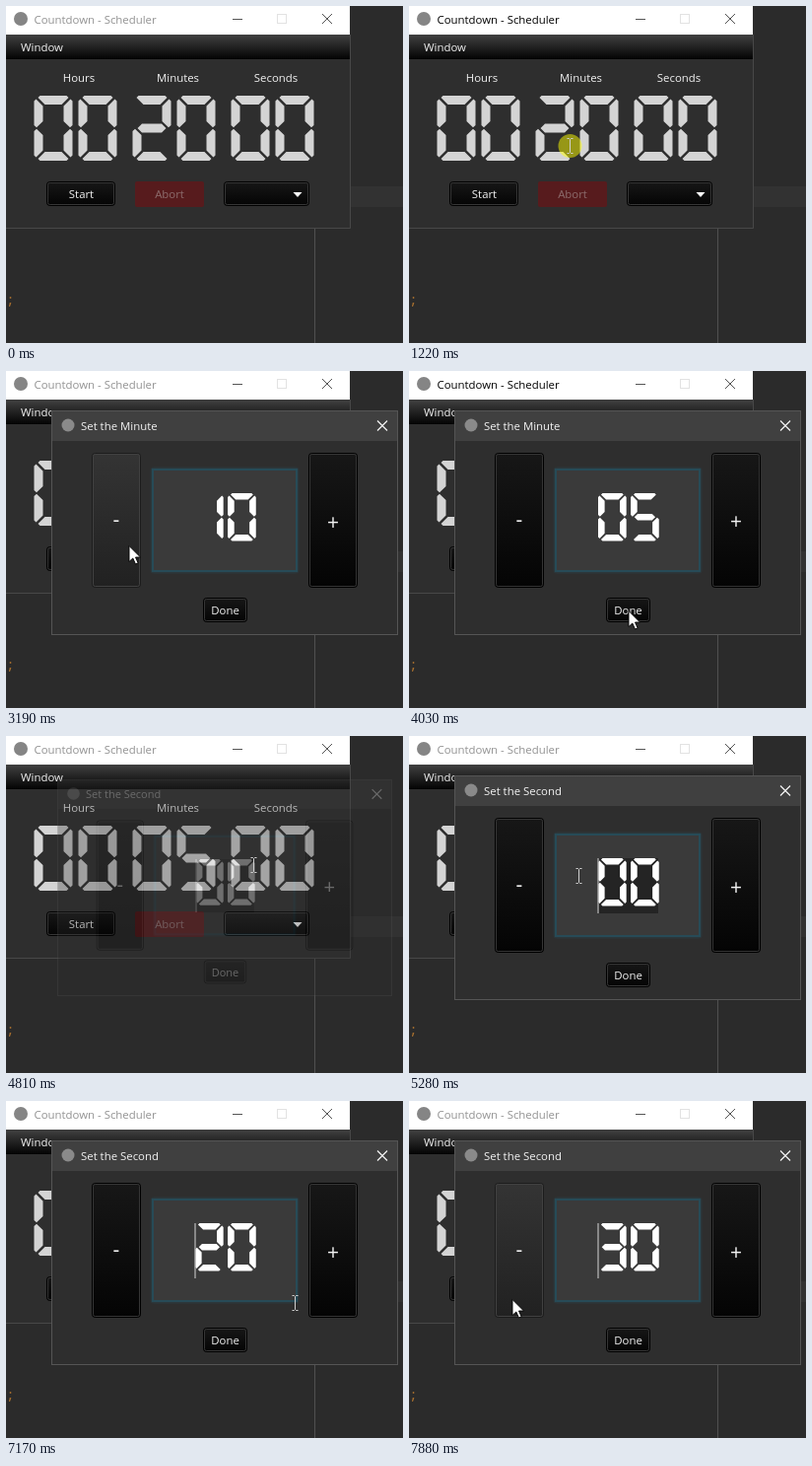
These frames come from a looping animation (403 by 342 pixels, 8 s). An HTML page:

```html
<!DOCTYPE html>
<html lang="en">
<head>
<meta charset="utf-8">
<title>Countdown</title>
<style>
html, body { margin: 0; width: 100%; height: 100%; overflow: hidden; background: #2b2b2b; }
svg { display: block; width: 403px; height: 342px; }
text { font: 11.4px "Open Sans", "Noto Sans", sans-serif; fill: #f2f2f2; }
.mid { text-anchor: middle; }
.sign { text-anchor: middle; font-size: 21px; }
.code { font: 14px "Noto Sans Mono", monospace; fill: #a8702f; }
.digits { fill: #d4d4d4; }
.button .face { fill: url(#dark); stroke: #000; }
.button .edge { fill: none; stroke: #353535; }
.button.hover .face { fill: url(#light); stroke: #1c1c1c; }
.button.hover .edge { stroke: #414141; }
</style>
</head>
<body>
<svg viewBox="0 0 403 342">
  <defs>
    <linearGradient id="dark" x2="0" y2="1"><stop stop-color="#171717"/><stop offset="1" stop-color="#040404"/></linearGradient>
    <linearGradient id="light" x2="0" y2="1"><stop stop-color="#343434"/><stop offset="1" stop-color="#212121"/></linearGradient>
    <linearGradient id="bar" x2="0" y2="1"><stop stop-color="#414141"/><stop offset="1" stop-color="#030303"/></linearGradient>
  </defs>

  <rect width="403" height="342" fill="#2b2b2b"/>
  <rect x="350" y="183" width="53" height="21" fill="#323232"/>
  <path d="M313.5 226V342" stroke="#505050"/>
  <text class="code" x="0" y="303">;</text>

  <g id="main">
    <rect width="350" height="226" fill="#2e2e2e"/>
    <path d="M349.5 29V225.5H0" fill="none" stroke="#484848"/>
    <rect width="349" height="29" fill="#fff"/>
    <circle cx="15" cy="13" r="7" fill="#858585"/>
    <text id="caption" x="28.5" y="18">Countdown - Scheduler</text>
    <path d="M230 13.5H240" stroke="#555"/>
    <rect x="275.5" y="8.5" width="9" height="9" fill="none" stroke="#e2e2e2"/>
    <path d="M321 8L331 18M331 8L321 18" stroke="#555"/>
    <rect y="29" width="349" height="25" fill="url(#bar)"/>
    <text x="15" y="46">Window</text>
    <text class="mid" x="74" y="77">Hours</text>
    <text class="mid" x="174.5" y="77">Minutes</text>
    <text class="mid" x="274" y="77">Seconds</text>
    <path class="digits" id="hours" transform="translate(28.5 91)"/>
    <path class="digits" id="minutes" transform="translate(128.5 91)"/>
    <path class="digits" id="seconds" transform="translate(228.5 91)"/>
    <g class="button" data-box="41 178 70 25"></g>
    <text class="mid" x="76.5" y="195">Start</text>
    <rect x="131" y="178" width="70" height="26" rx="2" fill="#571b1d"/>
    <text class="mid" x="166" y="195" style="fill:#8c6c6d">Abort</text>
    <g class="button" data-box="221 178 87 25"></g>
    <path d="M291.5 189H300.5L296 194Z" fill="#fff"/>
  </g>

  <g id="dialog">
    <rect x="46.5" y="40.5" width="351" height="227" fill="#2e2e2e" stroke="#555"/>
    <rect x="47" y="41" width="350" height="30" fill="#404040"/>
    <circle cx="63" cy="55" r="6.5" fill="#8a8a8a"/>
    <text id="heading" x="76" y="60"></text>
    <path d="M377 50.5L387 60.5M387 50.5L377 60.5" stroke="#f4f4f4" stroke-width="1.2"/>
    <g class="button" id="minus" data-box="87 83 50 137"></g>
    <text class="sign" x="112" y="158">-</text>
    <g class="button" id="plus" data-box="307 83 50 137"></g>
    <text class="sign" x="332" y="160.5" font-weight="600">+</text>
    <rect x="148" y="99" width="148" height="105" rx="2" fill="#3a3a3a" stroke="#2a4049" stroke-opacity=".5" stroke-width="3"/>
    <rect x="149" y="100" width="146" height="103" fill="none" stroke="#274b57" stroke-width="2"/>
    <rect id="mark" x="192" y="124" width="61" height="56" fill="#242424"/>
    <path id="value" fill="#fff" transform="translate(192 124) scale(.735)"/>
    <path id="caret" d="M192 124V180" stroke="#aaa" stroke-width="1.4"/>
    <g class="button" id="done" data-box="200 230 45 25"></g>
    <text class="mid" x="222.5" y="247">Done</text>
  </g>

  <g id="cursor">
    <circle id="press" r="12" fill="#ff0" opacity=".5"/>
    <path id="arrow" d="M.5 .5V16.5L4.3 13L7 19L9.6 17.8L7 12H12Z" fill="#fff" stroke="#000" stroke-width=".9"/>
    <path id="beam" d="M-3 -7.5H-1L0 -6.5L1 -7.5H3M0 -6.5V6.5M-3 7.5H-1L0 6.5L1 7.5H3" fill="none" stroke="#d0d0d0"/>
  </g>
</svg>

<script>
const LOOP = 8000, TICK = 78.37, FIRST = 200;
const $ = id => document.getElementById(id);
const show = (id, on) => { $(id).style.display = on ? "" : "none"; };
const clamp = v => Math.min(1, Math.max(0, v));

// Seven-segment glyphs on a 39 x 66 cell
const topBar = [[6, 0], [33, 0], [35, 2], [28, 9], [11, 9], [4, 2]];
const upLeft = [[2, 3.5], [0, 5.5], [0, 30], [2.5, 32.2], [9, 26], [9, 10.5]];
const middle = [[5, 33], [9.5, 28.5], [29.5, 28.5], [34, 33], [29.5, 37.5], [9.5, 37.5]];
const flipX = s => s.map(([x, y]) => [39 - x, y]);
const flipY = s => s.map(([x, y]) => [x, 66 - y]);
const segments = {
  a: topBar, b: flipX(upLeft), c: flipY(flipX(upLeft)), d: flipY(topBar),
  e: flipY(upLeft), f: upLeft, g: middle
};
const glyphs = { 0: "abcdef", 1: "bc", 2: "abged", 3: "abgcd", 5: "afgcd" };
const digits = text => [...text].map((ch, i) =>
  [...glyphs[ch]].map(s => "M" + segments[s].map(([x, y]) => [x + i * 45, y]).join("L") + "Z").join("")
).join("");

for (const b of document.querySelectorAll(".button")) {
  const [x, y, w, h] = b.dataset.box.split(" ").map(Number);
  b.innerHTML =
    `<rect class="face" x="${x + .5}" y="${y + .5}" width="${w - 1}" height="${h - 1}" rx="3"/>` +
    `<rect class="edge" x="${x + 1.5}" y="${y + 1.5}" width="${w - 3}" height="${h - 3}" rx="2"/>`;
}

// Pointer stops: time, x, y
const path = [
  [200, 262, 318], [750, 163, 142], [1770, 163, 142], [1840, 178, 147], [2230, 124, 177],
  [3400, 124, 177], [3880, 222, 243], [4250, 222, 243], [4650, 251, 131], [5130, 251, 131],
  [5430, 112, 150], [5600, 112, 150], [5990, 311, 152], [6060, 316, 156], [6840, 316, 156],
  [7000, 280, 236], [7090, 280, 236], [7165, 292, 206], [7240, 316, 180], [7490, 316, 180],
  [7870, 104, 201]
];
const presses = [[1140, 1290], [2540, 2615], [3180, 3325], [3950, 4030], [4650, 4735],
  [6070, 6150], [6230, 6310], [6700, 6770], [6780, 6850], [7325, 7395], [7405, 7480]];
const dialogs = [
  { name: "Minute", open: 1375, caret: 1330, close: 4040,
    values: [[0, "20"], [2390, "15"], [2615, "10"], [3325, "05"]] },
  { name: "Second", open: 4795, caret: 4795, close: Infinity,
    values: [[0, "00"], [6150, "05"], [6310, "10"], [6770, "15"], [6850, "20"], [7395, "25"], [7480, "30"]] }
];

function pointer(t) {
  const i = path.findIndex(p => p[0] > t);
  if (i < 0) return path[path.length - 1].slice(1);
  if (i === 0) return path[0].slice(1);
  const [t0, x0, y0] = path[i - 1], [t1, x1, y1] = path[i];
  const u = (t - t0) / (t1 - t0), k = u * u * (3 - 2 * u);
  return [x0 + (x1 - x0) * k, y0 + (y1 - y0) * k];
}

function drawDialog(d, t) {
  const p = t < d.close ? 1 - (1 - clamp((t - d.open) / 250)) ** 3 : 1 - clamp((t - d.close) / 190);
  const s = .95 + .05 * p;
  $("dialog").setAttribute("transform", `translate(222 154) scale(${s}) translate(-222 -154)`);
  $("dialog").setAttribute("opacity", p);
  $("heading").textContent = "Set the " + d.name;
  const step = d.values.filter(v => v[0] <= t).length - 1;
  $("value").setAttribute("d", digits(d.values[step][1]));
  show("mark", step === 0);
  show("caret", Math.floor((t - d.caret) / 500) % 2 === 0);
}

function draw(time) {
  // The screen is sampled at a fixed rate
  const t = Math.max(0, FIRST + Math.floor((time - FIRST + 20) / TICK) * TICK);
  const [x, y] = pointer(t);
  const down = presses.some(([a, b]) => t >= a && t < b);
  const within = (l, u, r, b) => x >= l && x <= r && y >= u && y <= b;
  const d = dialogs.find(d => t >= d.open && t < d.close + 200);
  const ready = d && t < d.close;

  show("dialog", !!d);
  if (d) drawDialog(d, t);
  $("minutes").setAttribute("d", digits(t < 4040 ? "20" : "05"));
  const active = (t >= 1140 && t < 1375) || (t >= 4040 && t < 4795);
  $("caption").style.fill = active ? "#000" : "#929292";

  const hover = (id, ...box) => $(id).classList.toggle("hover", !!ready && !down && within(...box));
  hover("minus", 87, 83, 137, 220);
  hover("plus", 307, 83, 357, 220);
  hover("done", 200, 230, 245, 255);

  const typing = ready ? within(148, 99, 296, 207) : within(20, 85, 320, 162);
  show("cursor", t >= FIRST);
  show("press", down);
  show("beam", typing);
  show("arrow", !typing);
  $("cursor").setAttribute("transform", `translate(${Math.round(x) + .5} ${Math.round(y)})`);
}

$("hours").setAttribute("d", digits("00"));
$("seconds").setAttribute("d", digits("00"));
const start = performance.now();
function frame() {
  draw((performance.now() - start) % LOOP);
  requestAnimationFrame(frame);
}
frame();
</script>
</body>
</html>
```
